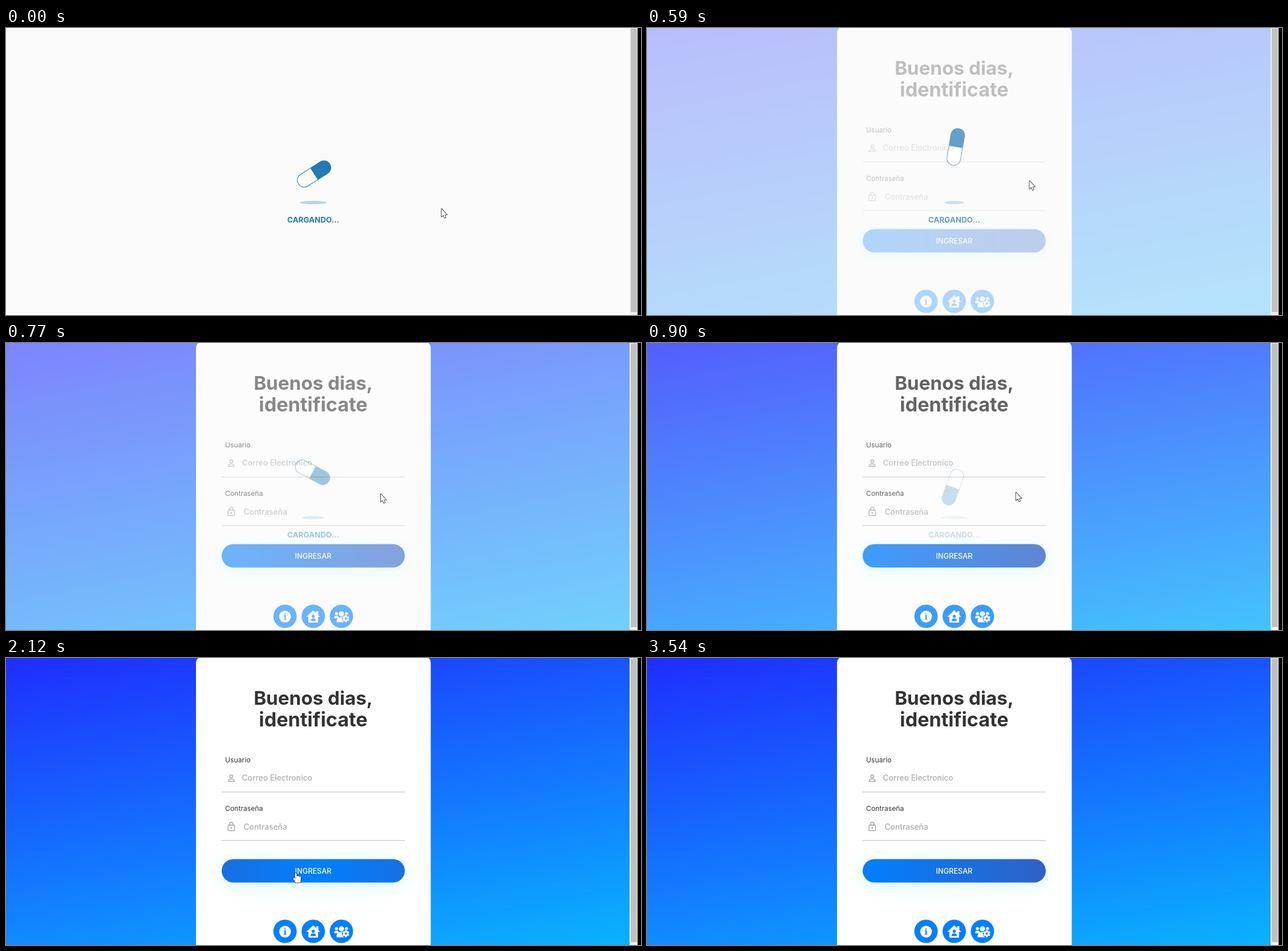
An HTML page with a canvas for the animation above (4310 ms loop, 1113x503 px).

```html
<!DOCTYPE html>
<html lang="es">
<head>
<meta charset="utf-8">
<title>Acceso</title>
<style>
html, body { margin: 0; width: 100%; height: 100%; overflow: hidden; background: #000; }
canvas { display: block; }
</style>
</head>
<body>
<canvas id="stage" width="1113" height="503"></canvas>
<script>
const LOOP = 4310, VIEW = 1093, H = 503, MID = 538.5;
const BLUE = '#007fff', DARK = '#2f60c6', PILL = '#237ab5', GRAY = '#a8a8a8';
const FONT = 'Inter, "Open Sans", sans-serif';
const ICON = { y: 479, r: 20.5, gap: 49.4 };

const stage = document.getElementById('stage').getContext('2d');
const veilCanvas = document.createElement('canvas');
veilCanvas.width = VIEW;
veilCanvas.height = H;
const veil = veilCanvas.getContext('2d');
let c = stage;

const clamp = v => Math.max(0, Math.min(1, v));
const iconX = i => MID + (i - 1) * ICON.gap;

// CSS "ease" timing curve
function ease(x) {
  x = clamp(x);
  let lo = 0, hi = 1, s;
  for (let i = 0; i < 20; i++) {
    s = (lo + hi) / 2;
    if (0.75 * s * (1 - s) + s ** 3 < x) lo = s; else hi = s;
  }
  return 0.3 * s * (1 - s) ** 2 + 3 * s * s * (1 - s) + s ** 3;
}

// Transition that turns back when the pointer leaves
function hover(t, enter, leave, ms = 400) {
  if (t < leave) return ease((t - enter) / ms);
  const top = ease((leave - enter) / ms);
  return top * (1 - ease((t - leave) / (ms * top)));
}

function box(x, y, w, h, r, fill) {
  c.beginPath();
  c.roundRect(x, y, w, h, r);
  if (fill) { c.fillStyle = fill; c.fill(); }
}

const disc = (x, y, r, fill) => box(x - r, y - r, 2 * r, 2 * r, r, fill);

function text(s, x, y, size, weight, fill, align = 'left', font = FONT) {
  c.font = `${weight} ${size}px ${font}`;
  c.textAlign = align;
  c.fillStyle = fill;
  c.fillText(s, x, y);
}

function gradient(x0, y0, x1, y1, ...colors) {
  const g = c.createLinearGradient(x0, y0, x1, y1);
  colors.forEach((col, i) => g.addColorStop(i / (colors.length - 1), col));
  return g;
}

// Move the drawing origin for one call
function at(x, y, angle, paint) {
  c.save();
  c.translate(x, y);
  c.rotate(angle);
  paint();
  c.restore();
}

function field(label, hint, hintX, y, icon) {
  text(label, 384, y, 12.2, 400, '#333');
  text(hint, hintX, y + 32.5, 13.8, 500, '#adadad');
  c.fillStyle = '#d2d2d2';
  c.fillRect(378, Math.round(y + 51), 321, 1.6);
  c.strokeStyle = GRAY;
  c.lineWidth = 1.5;
  at(394.8, y + 28, 0, icon);
}

function userIcon() {
  disc(0, -3.2, 2.6);
  c.stroke();
  box(-5.3, 1.8, 10.6, 3.6, [5, 5, 0, 0]);
  c.stroke();
}

function lockIcon() {
  box(-5.7, -3.2, 11.4, 9.8, 1.2);
  c.stroke();
  box(-3, -8.2, 6, 5, [3, 3, 0, 0]);
  c.stroke();
  disc(0, 1.7, 1.5, GRAY);
}

function button(t) {
  const x = 378, y = 352.5, w = 321, h = 41;
  const left = x - w + w * hover(t, 2000, 2230);
  c.save();
  c.shadowColor = 'rgba(0,219,222,0.16)';
  c.shadowBlur = 28;
  c.shadowOffsetY = 5;
  box(x, y, w, h, h / 2, gradient(left, 0, left + 3 * w, 0, DARK, BLUE, DARK, BLUE));
  c.restore();
  text('INGRESAR', MID, 378, 12.7, 500, '#fff', 'center');
}

function person(x, y, r, w, h, fill) {
  disc(x, y, r, fill);
  box(x - w / 2, y + r + 1, w, h, [w * 0.4, w * 0.4, 1, 1], fill);
}

function infoIcon() {
  disc(0, 0.6, 10.3, '#fff');
  text('i', 0, 6, 15, 700, BLUE, 'center', '"Noto Serif", serif');
}

function homeIcon() {
  c.fillStyle = '#fff';
  c.fill(new Path2D('M0 -10.5L12.3 1H-12.3Z'));
  box(5.2, -9, 3.8, 8, 0.5, '#fff');
  box(-8.5, -1, 17, 12, 1, '#fff');
  person(0, 0, 2.7, 9, 4.6, BLUE);
}

function teamIcon() {
  person(-8.7, -4.7, 2.7, 8, 4.5, '#fff');
  disc(9, -4.7, 2.7, '#fff');
  disc(0, -4, 5.6, BLUE);
  person(0, -4.2, 4.6, 17, 9, '#fff');
  at(7.7, 4, 0, () => {
    disc(0, 0, 7, BLUE);
    for (let i = 0; i < 6; i++) {
      at(0, 0, (i + 0.5) * Math.PI / 3, () => box(3, -1.7, 3.2, 3.4, 0.6, '#fff'));
    }
    disc(0, 0, 4.7, '#fff');
    disc(0, 0, 1.9, BLUE);
  });
}

function icons(t) {
  [infoIcon, homeIcon, teamIcon].forEach((icon, i) => at(iconX(i), ICON.y, 0, () => {
    disc(0, 0, ICON.r, BLUE);
    if (i === 0) {
      c.globalAlpha = hover(t, 2380, 3090);
      disc(0, 0, ICON.r, DARK);
      c.globalAlpha = 1;
    }
    icon();
  }));
}

function page(t) {
  c.fillStyle = gradient(0, 0, 133, 688, 'rgb(31,45,255)', 'rgb(10,178,255)');
  c.fillRect(0, 0, VIEW, H);
  box(333, -2, 411.5, 600, 10, '#fff');
  text('Buenos dias,', MID, 82, 33.2, 700, '#333', 'center');
  text('identificate', MID, 120, 34.2, 700, '#333', 'center');
  field('Usuario', 'Correo Electronico', 413.5, 182.5, userIcon);
  field('Contraseña', 'Contraseña', 416.5, 268, lockIcon);
  button(t);
  icons(t);
}

function loader(t) {
  c.fillStyle = '#fafafa';
  c.fillRect(0, 0, VIEW, H);
  const lift = Math.cos((t - 620) / 450 * Math.PI);
  const w = 44 - 9.5 * lift;
  c.fillStyle = 'rgba(35,122,181,0.3)';
  c.beginPath();
  c.ellipse(MID, 306, w / 2, 3, 0, 0, 7);
  c.fill();

  // The spin slowly gains speed
  const angle = -33 + 0.474 * t + 0.0000933 * t * t;
  at(MID, 240.8 - 33.5 * lift, angle * Math.PI / 180, () => {
    c.translate(0, 2.7);
    box(-32.5, -12, 65, 24, 12, '#fff');
    c.strokeStyle = PILL;
    c.lineWidth = 1;
    c.stroke();
    box(0, -12.3, 33, 24.6, [0, 12.3, 12.3, 0], PILL);
  });
  text('CARGANDO...', MID, 341, 13.4, 700, PILL, 'center');
}

function scrollbar() {
  c.fillStyle = '#f1f1f1';
  c.fillRect(VIEW, 0, 14, H);
  c.fillStyle = '#c1c1c1';
  c.fillRect(VIEW + 2, 1, 11, 497);
  c.fillStyle = '#000';
  c.fillRect(VIEW + 14, 0, 6, H);
}

// Key points of the pointer: time, x, y
const PATH = [
  [0, 763.5, 317], [590, 670.5, 268], [900, 647, 262], [1330, 489, 203], [1730, 491, 248],
  [2120, 508, 376], [2350, 496, 438], [2480, 489, 475], [3020, 489, 477], [3520, 1000, 506]
];

function pointerAt(t) {
  const i = PATH.findIndex(p => p[0] > t);
  if (i < 0) return null;
  const [t0, x0, y0] = PATH[i - 1], [t1, x1, y1] = PATH[i];
  const k = (t - t0) / (t1 - t0);
  return [x0 + (x1 - x0) * k, y0 + (y1 - y0) * k];
}

const arrow = new Path2D('M0 0V14L3.2 11L5.4 16L7.4 15.1L5.3 10.3H9.6Z');
const hand = new Path2D();
for (let i = 0; i < 4; i++) hand.roundRect(-1.3 + 2.5 * i, i ? 4.8 + 0.6 * i : 0.3, 2.6, 9, 1.3);
hand.roundRect(-4.2, 8.5, 3, 5, 1.5);
hand.roundRect(-2, 9.5, 10.7, 8, 3);

const caret = new Path2D('M-3 -6.5H3M0 -6.5V6.5M-3 6.5H3');

function pointer(t) {
  const spot = pointerAt(t);
  if (!spot) return;
  const [x, y] = spot;
  const within = (a, b) => y > a && y < b;
  const onField = t > 950 && x > 378 && x < 699 && (within(190, 236) || within(276, 321));
  const onIcon = [0, 1, 2].some(i => Math.hypot(x - iconX(i), y - ICON.y) < ICON.r);
  const onButton = within(352, 393.5);
  const path = onField ? caret : onButton || onIcon ? hand : arrow;
  at(x, y, 0, () => {
    c.lineJoin = 'round';
    c.lineWidth = onField ? 1.3 : 1.6;
    c.strokeStyle = '#222';
    c.fillStyle = '#fff';
    c.stroke(path);
    if (!onField) c.fill(path);
  });
}

function draw(t) {
  c = stage;
  page(t);
  const fade = 0.5 + Math.cos(Math.PI * clamp((t - 225) / 1000)) / 2;
  if (fade > 0) {
    c = veil;
    loader(t);
    c = stage;
    c.globalAlpha = fade;
    c.drawImage(veilCanvas, 0, 0);
    c.globalAlpha = 1;
  }
  pointer(t);
  scrollbar();
}

function tick() {
  draw(performance.now() % LOOP);
  requestAnimationFrame(tick);
}
tick();
</script>
</body>
</html>
```
